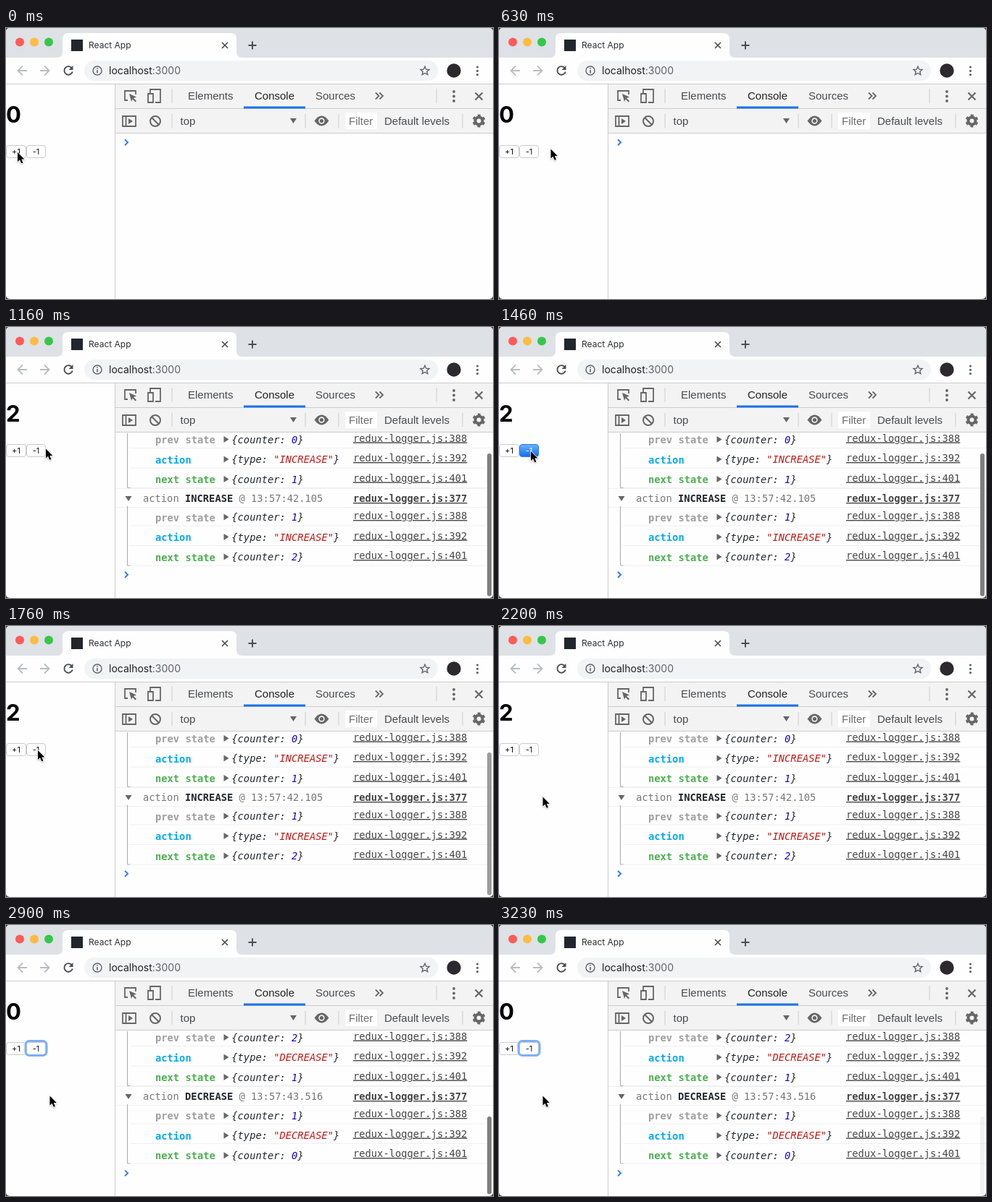
Recreate the animation shown at these times as an HTML page. Size 672x375 px, loop 3.3 s.

```html
<!DOCTYPE html>
<html lang="en">
<head>
<meta charset="utf-8">
<title>Counter with console log</title>
<style>
html, body { margin: 0; width: 100%; height: 100%; overflow: hidden; background: #444; }
svg { display: block; width: 672px; height: 375px; }
text { white-space: pre; }
.ui { font-family: Inter, Roboto, sans-serif; }
.tool { font: 15px "Liberation Sans", Arial, sans-serif; fill: #484b4f; }
.mono { font: 13.75px "DejaVu Sans Mono", "Liberation Mono", monospace; fill: #23282e; }
.bold { font-weight: bold; }
.italic { font-style: italic; }
.link { text-decoration: underline; fill: #454545; }
.line { fill: none; stroke: #666; stroke-width: 1.8; }
.sep { stroke: #ccc; }
</style>
</head>
<body>
<svg viewBox="0 0 672 375">
  <defs>
    <clipPath id="win"><rect width="672" height="375" rx="5"/></clipPath>
    <clipPath id="view"><rect x="151" y="147" width="521" height="228"/></clipPath>
    <linearGradient id="press" x2="0" y2="1"><stop stop-color="#6cb3fa"/><stop offset="1" stop-color="#0e6cf7"/></linearGradient>
  </defs>
  <g clip-path="url(#win)">
    <rect width="672" height="375" fill="#fefefe"/>
    <rect width="672" height="41" fill="#dee1e6"/>
    <!-- tab strip -->
    <path d="M70 41q8 0 8-8V15q0-8 8-8H310q8 0 8 8V33q0 8 8 8Z" fill="#fefefe"/>
    <circle cx="19" cy="19.600" r="6" fill="#fc5b57"/>
    <circle cx="39" cy="19.600" r="6" fill="#fdbc40"/>
    <circle cx="59" cy="19.600" r="6" fill="#34c748"/>
    <rect x="90" y="16" width="16" height="16" fill="#20262c"/>
    <text class="ui" x="114" y="28" font-size="12" fill="#2c2f33">React App</text>
    <g fill="none" stroke="#4a4d51" stroke-width="1.700">
      <path d="M298 20l8 8m0-8l-8 8"/>
      <path d="M334.500 24h11m-5.500-5.500v11" stroke-width="1.900"/>
      <path d="M29 59H16.500m6.500-6.500l-6.500 6.500 6.500 6.500M47 59h12.500m-6.500-6.500l6.500 6.500-6.500 6.500" stroke="#b9bcc0" stroke-width="1.800"/>
      <path d="M90.500 55A5.800 5.800 0 1 0 91.800 60.500" stroke-width="1.900"/>
    </g>
    <path d="M92.500 52v6h-6Z" fill="#4a4d51"/>
    <!-- address bar -->
    <rect x="108" y="45" width="488" height="28" rx="14" fill="#f1f3f4"/>
    <circle cx="126" cy="59" r="6" fill="none" stroke="#5f6368" stroke-width="1.400"/>
    <path d="M126 58v4.500m0-7.500v1.600" stroke="#5f6368" stroke-width="1.600"/>
    <text class="ui" x="142" y="64" font-size="14" fill="#202124">localhost<tspan fill="#5f6368">:3000</tspan></text>
    <path d="M578 53.300l1.700 3.900 4.300.400-3.200 2.900 1 4.200-3.800-2.200-3.800 2.200 1-4.200-3.200-2.900 4.300-.4Z" fill="none" stroke="#5f6368" stroke-width="1.400"/>
    <circle cx="618" cy="59" r="9.700" fill="#2c2a2e"/>
    <g fill="#5f6368"><circle cx="650.500" cy="54" r="1.600"/><circle cx="650.500" cy="59.300" r="1.600"/><circle cx="650.500" cy="64.600" r="1.600"/></g>
    <!-- developer tools -->
    <rect x="151" y="78" width="521" height="68" fill="#f3f3f3"/>
    <path class="sep" d="M0 77.500H672M150.500 78V375M151 111.500H672M151 145.500H672"/>
    <path class="sep" d="M229 84v20M594 84v20M229 119v19M413 119v19M459 119v19M630 119v19"/>
    <rect x="328" y="108.500" width="85" height="3" fill="#1a73e8"/>
    <g class="tool">
      <text x="251" y="99">Elements</text>
      <text x="343" y="99" style="fill:#222">Console</text>
      <text x="427" y="99">Sources</text>
      <text x="240.500" y="134">top</text>
      <rect x="468" y="117" width="44" height="23" fill="#fff"/>
      <text x="473" y="134" style="fill:#6c6c6c">Filter</text>
      <text x="522" y="134">Default levels</text>
    </g>
    <g class="line">
      <path d="M168 100h-4V87h15v5"/>
      <path d="M199 90V85h14v18h-7M196 91h7v12h-7Z"/>
      <path d="M510 89.500l4.500 4.500-4.500 4.500m5.500-9l4.500 4.500-4.500 4.500"/>
      <path d="M647.500 89.500l10 10m0-10l-10 10" stroke-width="2.200"/>
      <path d="M161 122h18v14h-18Zm4.500 0v14"/>
      <circle cx="206" cy="129" r="7" stroke-width="2"/>
      <path d="M201 124l10 10" stroke-width="2"/>
      <circle cx="652.500" cy="128.500" r="5" stroke-width="4"/>
      <circle cx="652.500" cy="128.500" r="7.600" stroke-width="2.600" stroke-dasharray="3.980" stroke-dashoffset="-1.990"/>
    </g>
    <g fill="#666">
      <path d="M170 91l10 4.500-4 1.500 4 4-1.500 1.500-4-4-1.500 3.500Z"/>
      <circle cx="618" cy="88" r="1.900"/><circle cx="618" cy="94.500" r="1.900"/><circle cx="618" cy="101" r="1.900"/>
      <path d="M169 125l6 4-6 4ZM392 125h9l-4.500 7Z"/>
      <path d="M425.500 128.500q10-14 20 0q-10 14-20 0Z"/>
    </g>
    <circle cx="435.500" cy="128.500" r="3.400" fill="#666" stroke="#f3f3f3" stroke-width="1.600"/>
    <!-- page -->
    <text id="count" class="ui bold" x="0" y="131" font-size="31"></text>
    <g id="buttons" class="ui" font-size="11" text-anchor="middle"></g>
    <g id="log" clip-path="url(#view)"></g>
    <rect id="thumb" x="664" width="6" rx="3" fill="#7f7f7f"/>
    <path id="cursor" d="M1 1V14L4 11.300 6.200 16.300 8.400 15.400 6.300 10.500H10.300Z" stroke="#fff" stroke-width="1.400" paint-order="stroke" style="filter:drop-shadow(0 1px 1px #0004)"/>
  </g>
</svg>
<script>
const $ = id => document.getElementById(id);
const LOOP = 3300, PITCH = 107.5;
const counts = [[1000, 1], [1130, 2], [2430, 1], [2530, 0]];
const logs = [
  { at: 1030, type: 'INCREASE', time: '41.990', prev: 0, next: 1 },
  { at: 1150, type: 'INCREASE', time: '42.105', prev: 1, next: 2 },
  { at: 2460, type: 'DECREASE', time: '43.400', prev: 2, next: 1 },
  { at: 2560, type: 'DECREASE', time: '43.516', prev: 1, next: 0 }
];
const thumbTop = [0, 0, 175, 229, 265];
const path = [
  [400, 15, 171], [590, 72, 168], [630, 70.5, 166.5], [760, 54, 167.5],
  [1200, 54, 167.5], [1330, 43, 171], [1770, 43, 171], [1960, 59.5, 235.5]
];
const within = (t, a, b) => t >= a && t < b;

function cursorAt(t) {
  const i = path.findIndex(p => p[0] > t);
  if (i < 1) return path.at(i).slice(1);
  const [t0, x0, y0] = path[i - 1], [t1, x1, y1] = path[i];
  const u = (t - t0) / (t1 - t0), k = u * u * (3 - 2 * u);
  return [x0 + (x1 - x0) * k, y0 + (y1 - y0) * k];
}

function button(x, w, label, down, focus) {
  const ring = focus ? `<rect x="${x - 1}" y="160.500" width="${w + 2}" height="20" rx="5" fill="none" stroke="#7eaef2" stroke-width="3"/>` : '';
  return `<rect x="${x + .5}" y="162.500" width="${w - 1}" height="17" rx="3.500" fill="${down ? 'url(#press)' : '#fff'}" stroke="${down ? '#2a79e0' : '#cacaca'}"/>${ring}
    <text x="${x + w / 2}" y="175" fill="${down ? '#fff' : '#111'}">${label}</text>`;
}

const text = (x, y, s, cls = '', fill = '') =>
  `<text class="mono ${cls}" x="${x}" y="${y}"${fill && ` style="fill:${fill}"`}>${s}</text>`;
const link = (y, line, cls = '') => text(479, y, 'redux-logger.js:' + line, 'link ' + cls);
const colored = (s, fill) => `<tspan fill="${fill}">${s}</tspan>`;

function row(y, label, color, value, line, nudge) {
  const b = y + 5 + nudge;
  return text(206, b + .5, label, 'bold', color)
    + `<path d="M300.500 ${b - 9.5}l7 4.500-7 4.500Z" fill="#666"/>`
    + text(311.3, b, `{${value}}`, 'italic')
    + link(y + 3, line)
    + `<path d="M171 ${y + 12}H672" stroke="#f0f0f0"/>`;
}

function group(g, top, nudge) {
  const state = n => 'counter: ' + colored(n, '#1c00cf');
  return `<path d="M151 ${top + .5}H672M151 ${top + 26.5}H672" stroke="#f0f0f0"/>
    <path d="M164.500 ${top + 11}h9l-4.500 7Z" fill="#666"/>`
    + text(189, top + 19, 'action', '', '#777')
    + text(247, top + 19, g.type, 'bold')
    + text(321.5, top + 19, '@ 13:57:' + g.time, '', '#777')
    + link(top + 19, 377, 'bold')
    + row(top + 40, 'prev state', '#9e9e9e', state(g.prev), 388, nudge)
    + row(top + 67.5, 'action', '#03a9f4', 'type: ' + colored(`"${g.type}"`, '#c41a16'), 392, nudge)
    + row(top + 95, 'next state', '#4caf50', state(g.next), 401, nudge)
    + `<path d="M167.500 ${top + 25}V${top + 107}h4" fill="none" stroke="#aaa"/>`;
}

function consoleView(n) {
  const last = n ? Math.min(146 + PITCH * (n - 1), 223) : 38.5;
  const nudge = n > 3 ? .7 : 0;
  const y = last + 119.7 + nudge;
  return logs.slice(0, n).map((g, i) => group(g, last - PITCH * (n - 1 - i), i === n - 1 ? nudge : 0)).join('')
    + `<path d="M164 ${y - 4}l4 4-4 4" fill="none" stroke="#367cf1" stroke-width="2"/>`;
}

// Stays solid until start, then drops away with increasing speed.
function fade(t, start) {
  const u = Math.max(0, (t - start) / 147);
  return Math.max(0, 1 - u * u);
}

function thumbAlpha(t) {
  if (t < 1150) return 0;
  return t < 2460 ? fade(t, 1690) : Math.max(.09, fade(t, 3090));
}

const drawn = {};
function put(id, html) {
  if (drawn[id] !== html) $(id).innerHTML = drawn[id] = html;
}

function render(t) {
  const n = logs.filter(g => t >= g.at).length;
  const plus = within(t, 60, 130);
  const minus = within(t, 1360, 1430) || within(t, 1460, 1530);
  put('count', String(counts.reduce((v, [at, c]) => t >= at ? c : v, 0)));
  put('buttons', button(0, 28, '+1', plus) + button(28, 27, '-1', minus, t >= 2900));
  put('log', consoleView(n));
  $('thumb').setAttribute('y', thumbTop[n]);
  $('thumb').setAttribute('height', 372.5 - thumbTop[n]);
  $('thumb').setAttribute('opacity', thumbAlpha(t));
  $('cursor').setAttribute('transform', `translate(${cursorAt(t)})`);
}

const begin = performance.now();
function tick() {
  render((performance.now() - begin) % LOOP);
  requestAnimationFrame(tick);
}
tick();
</script>
</body>
</html>
```
